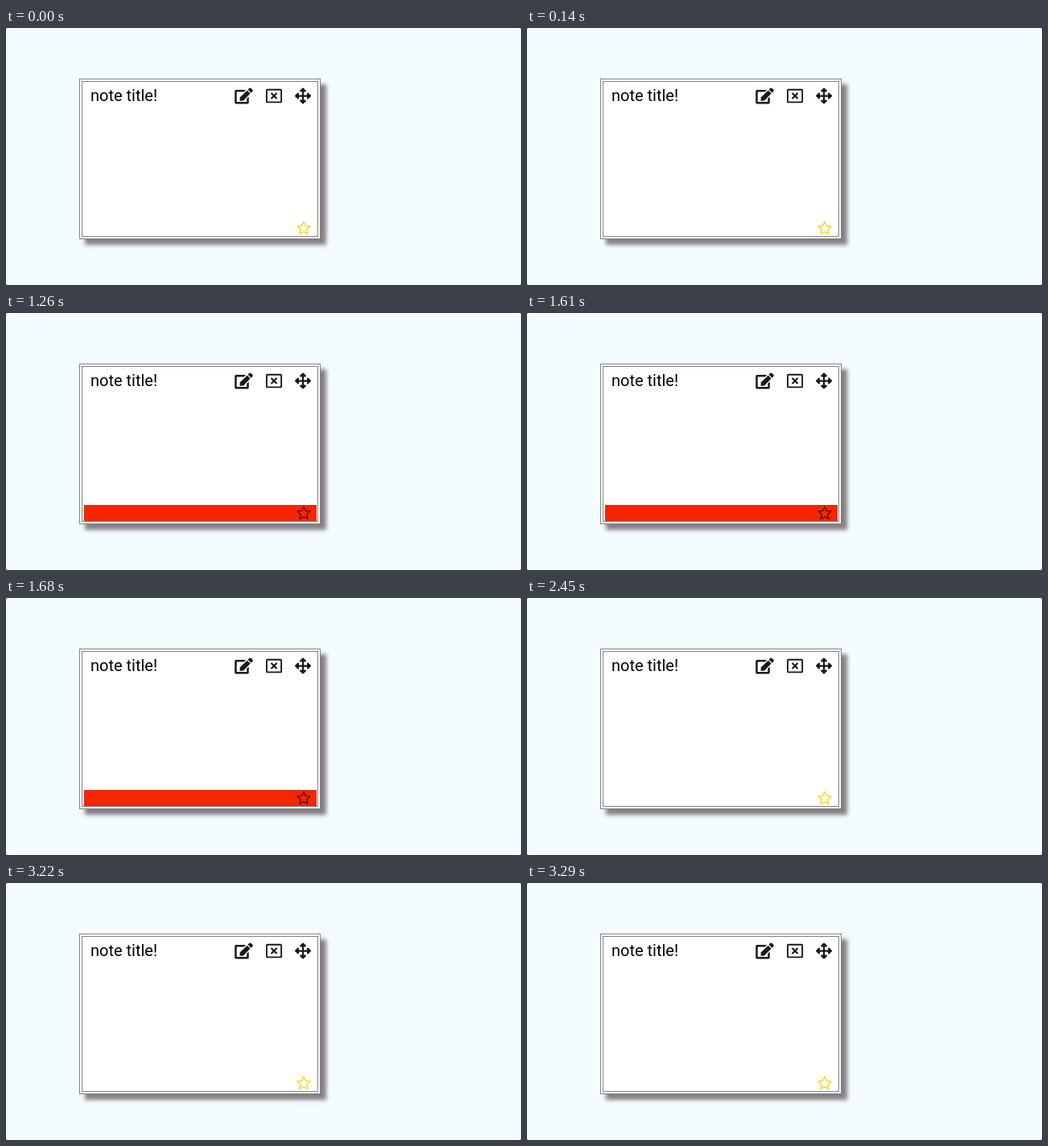
Write an HTML page that moves like this. It is 640 px wide and 320 px high and loops after 3.5 s.

```html
<!DOCTYPE html>
<html lang="en">
<head>
<meta charset="utf-8">
<title>Note card</title>
<style>
  html, body { margin: 0; width: 100%; height: 100%; overflow: hidden; background: #667; }
  .stage { position: relative; width: 640px; height: 320px; border-radius: 2px; background: #f3fcff; overflow: hidden; }
  .note {
    position: absolute; left: 91px; top: 63px; width: 300px; height: 200px;
    box-sizing: border-box; border: 4px double #808086; background: #fff;
    box-shadow: 7px 7px 5px #857f83;
  }
  .bar {
    position: absolute; left: 97px; top: 239px; width: 289px; height: 20px;
    box-sizing: border-box; border: 1px solid #d0321c; background: #f62600;
    opacity: 0;
  }
  svg { position: absolute; left: 0; top: 0; }
  text { font: 20px Roboto, sans-serif; fill: #000; }
  .icon { fill: #17191c; }
  .line { fill: none; stroke: #17191c; }
  .star { fill: none; stroke: #f0d92c; stroke-width: 46; stroke-linejoin: round; }
</style>
</head>
<body>
<div class="stage">
  <div class="note"></div>
  <div class="bar"></div>
  <svg width="640" height="320">
    <defs>
      <path id="arm" d="M228 256V127H177Q145 122 160 86L239 7Q256-7 273 7L352 86Q367 122 335 127H284V256Z"/>
    </defs>
    <text x="105" y="91">note title!</text>

    <g class="icon" transform="translate(284.2 74.5) scale(.0392)">
      <path d="M384 346V448H64V128H294L302 124L342 84Q350 64 334 64H48Q0 64 0 112V464Q0 512 48 512H400Q448 512 448 464V306Q440 284 427 298L387 338Z"/>
      <path d="M396 80L496 180L274 406L182 416Q158 416 160 394L170 302Z"/>
      <path d="M565 60L516 11Q488-11 461 11L425 47Q418 54 425 61L515 151Q522 158 529 151L565 115Q587 88 565 60Z"/>
    </g>

    <g class="line" transform="translate(323 74.5) scale(.0392)">
      <rect x="24" y="56" width="464" height="400" rx="24" stroke-width="48"/>
      <path d="M167 167L345 345M345 167L167 345" stroke-width="55"/>
    </g>

    <g class="icon" transform="translate(359 74.5) scale(.0392)">
      <use href="#arm"/>
      <use href="#arm" transform="rotate(90 256 256)"/>
      <use href="#arm" transform="rotate(180 256 256)"/>
      <use href="#arm" transform="rotate(270 256 256)"/>
    </g>

    <polygon class="star" transform="translate(370 249.6) scale(.0335)"/>
  </svg>
</div>
<script>
  const LOOP = 3500, ON = 1260, OFF = 2450;
  const bar = document.querySelector('.bar');
  const star = document.querySelector('.star');

  const points = Array.from({ length: 10 }, (_, i) => {
    const r = i % 2 ? 122 : 250;
    const a = i * Math.PI / 5;
    return [r * Math.sin(a), -r * Math.cos(a)].map(v => v.toFixed(1)).join();
  });
  star.setAttribute('points', points.join(' '));

  function draw(now) {
    const t = now % LOOP;
    const marked = t >= ON && t < OFF;
    bar.style.opacity = marked ? 1 : 0;
    star.style.stroke = marked ? '#65130c' : '#f0d92c';
  }

  const start = performance.now();
  function tick() {
    draw(performance.now() - start);
    requestAnimationFrame(tick);
  }
  tick();
</script>
</body>
</html>
```
